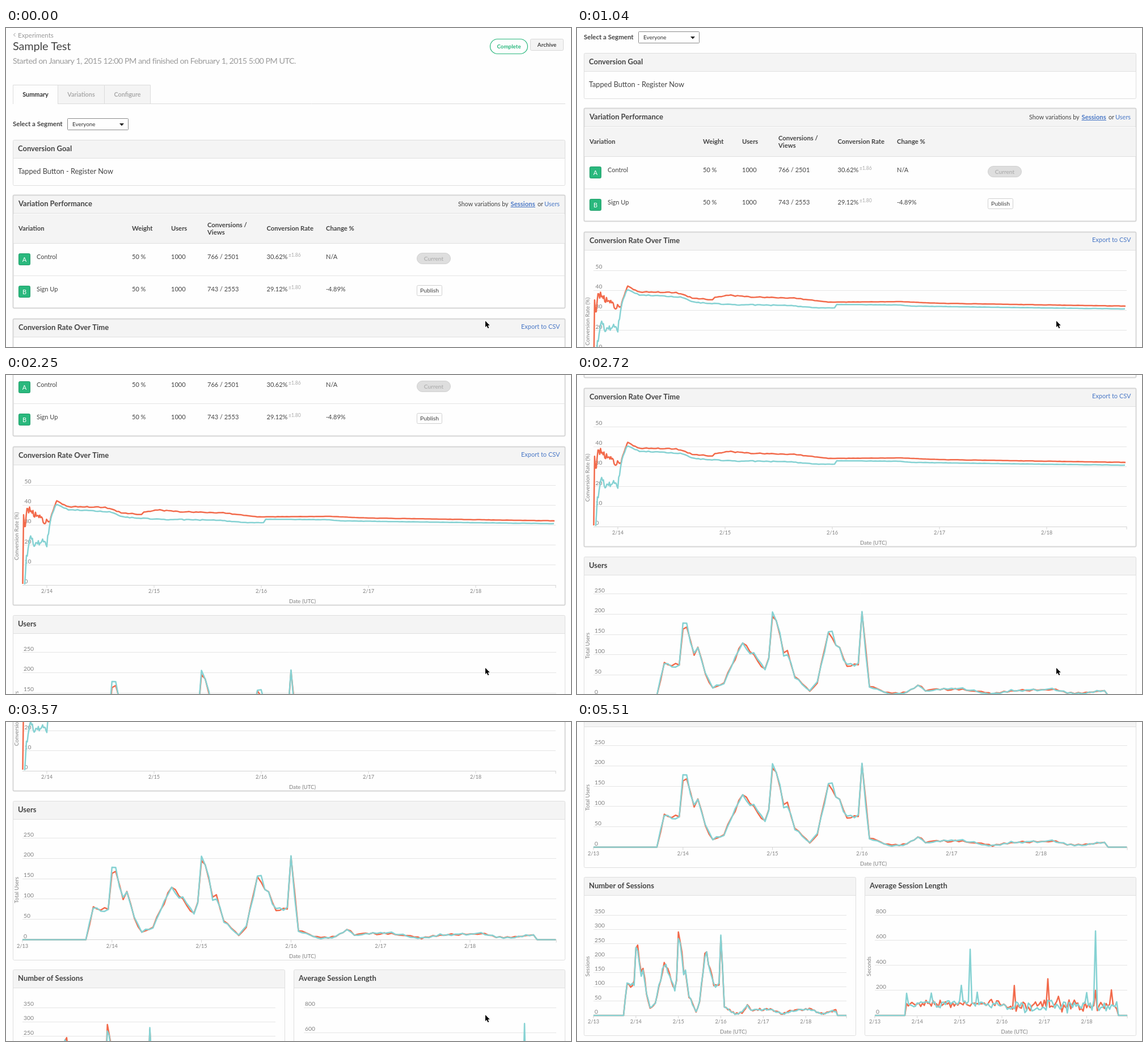
These frames come from a looping animation (996 by 562 pixels, 6.66 s). An HTML page with a canvas:

```html
<!DOCTYPE html>
<html lang="en">
<head>
<meta charset="utf-8">
<title>Sample Test</title>
<style>
html, body { margin: 0; width: 100%; height: 100%; overflow: hidden; background: #fefefe; }
canvas { display: block; }
</style>
</head>
<body>
<canvas id="stage" width="996" height="562"></canvas>
<script>
const W = 996, H = 562, LOOP = 6660;
const ctx = document.getElementById('stage').getContext('2d');
const RED = '#f26a4b', TEAL = '#86d2d3', GREEN = '#2ab87d', BLUE = '#4a78c6';
const INK = '#444', GREY = '#808080', PALE = '#f4f4f4', LINE = '#dcdcdc';

// The picture only changes at these moments: [first, count, interval]
const TICKS = [
  [0, 1, 0], [630, 1, 0], [800, 6, 116], [1500, 5, 150], [2250, 6, 118], [2960, 2, 110],
  [3220, 6, 118], [3930, 3, 115], [4550, 1, 0], [4940, 7, 95]
].flatMap(([t, n, gap]) => Array.from({ length: n }, (_, i) => t + i * gap));

// Time, scroll offset
const SCROLL = [
  [0, 0], [580, 0], [1040, 156], [1500, 285], [1650, 302], [1800, 303], [2250, 386],
  [3070, 599], [3220, 606], [3570, 706], [4160, 834], [4550, 833], [LOOP, 833]
];

// Conversion rate: x, y below the top of its card
const RATE_A = [
  [29.5, 242], [30, 103], [33, 155], [37, 108], [47, 118], [62, 127], [75, 136], [89, 96],
  [110, 106], [175, 107], [205, 117], [240, 120], [242, 115], [270, 112], [308, 115],
  [385, 117], [445, 124], [570, 123], [640, 126], [969, 131]
];
const RATE_B = [
  [33, 243], [36, 194], [43, 161], [52, 174], [62, 165], [72, 171], [79, 126], [88, 102],
  [110, 111], [185, 115], [205, 124], [262, 128], [380, 130], [420, 134], [455, 134],
  [457, 128], [570, 129], [590, 131], [969, 136]
];

// Users at turning points: hour, count
const USERS = [
  [17, 0], [19, 78], [21, 70], [23, 80], [24, 172], [25, 170], [27, 100], [28, 118], [30, 52],
  [32, 18], [35, 32], [40, 128], [43, 101], [46, 62], [47, 88], [48, 198], [50, 150], [51, 99],
  [52, 105], [54, 46], [58, 10], [60, 32], [63, 152], [64, 150], [68, 74], [71, 78], [72, 200],
  [74, 21], [80, 4], [84, 7], [87, 25], [89, 13], [99, 16], [107, 3], [112, 12], [123, 15],
  [129, 4], [137, 12], [138, 0], [143, 0]
];

function random(seed) {
  return () => (seed = (seed * 16807) % 2147483647) / 2147483647;
}

function span(keys, x) {
  const i = keys.findIndex(k => k[0] >= x);
  return i < 0 ? keys.length - 1 : Math.max(1, i);
}

function linear(keys, x) {
  const i = span(keys, x), [x0, y0] = keys[i - 1], [x1, y1] = keys[i];
  return y0 + (y1 - y0) * (x - x0) / (x1 - x0);
}

// Smooth monotone curve through the keys
function smooth(keys, x) {
  const i = span(keys, x), [x0, y0] = keys[i - 1], [x1, y1] = keys[i];
  const slope = j => j < 1 || j >= keys.length ? 0
    : (keys[j][1] - keys[j - 1][1]) / (keys[j][0] - keys[j - 1][0]);
  const tangent = j => {
    const a = slope(j), b = slope(j + 1);
    return a * b > 0 ? 2 * a * b / (a + b) : 0;
  };
  const w = x1 - x0, u = (x - x0) / w, v = 1 - u;
  return y0 * v * v * (1 + 2 * u) + y1 * u * u * (3 - 2 * u)
    + w * u * v * (v * tangent(i - 1) - u * tangent(i));
}

const hourly = f => Array.from({ length: 144 }, (_, h) => f(h));

function traffic(seed, scale) {
  const r = random(seed);
  return hourly(h => {
    const v = h < 17 ? 0 : linear(USERS, h), n = 2 * r() - 1;
    return v ? scale * Math.max(0, v + n * (2 + v * 0.05)) : 0;
  });
}

function lengths(seed, spikes) {
  const r = random(seed);
  return hourly(h => {
    const n = r() + r() - 1;
    if (h < 18 || h > 137) return 0;
    return spikes[h] || (h < 75 ? 92 + n * 38 : 75 + n * 58);
  });
}

// Restless at first, calm once the average has settled
function rate(keys, seed) {
  const r = random(seed), points = [];
  for (let x = keys[0][0]; x <= 969; x += x < 90 ? 1.5 : 4) {
    const wobble = points.length < 2 ? 0 : x < 80 ? 12 : x < 400 ? 1.6 : 0.4;
    points.push([x, 512 + linear(keys, x) + (r() - 0.5) * wobble]);
  }
  return points;
}

const usersA = traffic(71, 1), usersB = traffic(905, 1);
const sessA = traffic(318, 1.43), sessB = traffic(1207, 1.41);
const lenA = lengths(4177, { 79: 238, 98: 292, 104: 152, 125: 200, 134: 203 });
const lenB = lengths(2203, { 18: 176, 32: 178, 49: 240, 54: 527, 58: 185, 120: 182, 125: 672 });
const rateA = rate(RATE_A, 53), rateB = rate(RATE_B, 641);

function text(s, x, y, size, color = INK, weight = 400, align = 'left', spacing = 0) {
  ctx.font = `${weight} ${size}px Lato, "Open Sans", sans-serif`;
  ctx.letterSpacing = spacing + 'px';
  ctx.fillStyle = color;
  ctx.textAlign = align;
  ctx.fillText(s, x, y);
}
const bold = (s, x, y, size, color, align) => text(s, x, y, size, color, 700, align);

function path(points) {
  ctx.beginPath();
  points.forEach(([x, y]) => ctx.lineTo(x, y));
}

function line(points, color, width = 1) {
  path(points);
  ctx.strokeStyle = color;
  ctx.lineWidth = width;
  ctx.lineJoin = 'round';
  ctx.stroke();
}
const rule = (x0, y0, x1, y1, color = LINE) => line([[x0, y0], [x1, y1]], color);

function box(x, y, w, h, r, fill, stroke, lw = 1) {
  ctx.beginPath();
  ctx.roundRect(x + 0.5, y + 0.5, w - 1, h - 1, r);
  if (fill) { ctx.fillStyle = fill; ctx.fill(); }
  if (stroke) { ctx.strokeStyle = stroke; ctx.lineWidth = lw; ctx.stroke(); }
}

function panel(title, x, y, w, h, heavy) {
  box(x, y, w, h, 2, '#fefefe');
  ctx.fillStyle = PALE;
  ctx.fillRect(x + 1, y + 1, w - 2, 31);
  rule(x, y + 32.5, x + w, y + 32.5, '#e0e0e0');
  box(x, y, w, h, 2, null, heavy ? '#d6d6d6' : '#dedede', heavy ? 1.9 : 1);
  bold(title, x + (heavy ? 10 : 9), y + 20, 13);
}

function axes(c) {
  for (let v = 0; v <= c.max; v += c.step) {
    const y = c.base - (c.base - c.top) * v / c.max, row = Math.floor(y) + 0.5;
    rule(c.x0, row, c.x1, row, v ? '#e5e5e5' : '#d4d4d4');
    text(v, c.x0 + c.inset, y - 3, 10.3, GREY);
  }
  for (let i = 0; i < 6 - c.skip; i++) {
    const x = c.tick + c.day * i;
    rule(x, c.base, x, c.base + 5, '#d4d4d4');
    text('2/' + (13 + c.skip + i), x, c.base + 14, 9.2, GREY, 400, 'center');
  }
  rule(c.x1, c.base, c.x1, c.base + 5, '#d4d4d4');
  text('Date (UTC)', c.mid, c.base + 32, 9.7, GREY, 400, 'center');
  ctx.save();
  ctx.translate(c.x0 - 7.5, (c.base + c.top) / 2 + 2);
  ctx.rotate(-Math.PI / 2);
  text(c.name, 0, 0, 9.6, GREY, 400, 'center');
  ctx.restore();
}

function hourChart(c, a, b) {
  c = { inset: 2, skip: 0, tick: c.x0, ...c };
  axes(c);
  const place = list => list.map((v, h) => [
    c.x0 + c.day * h / 24, c.base - (c.base - c.top) * v / c.max
  ]);
  line(place(a), RED, 2.5);
  line(place(b), TEAL, 2.5);
}

function rateChart() {
  axes({ x0: 29, x1: 969, base: 756, top: 580, max: 50, step: 10, inset: 3.5,
    tick: 72, day: 189, skip: 1, mid: 522.5, name: 'Conversion Rate (%)' });
  line(rateA, RED, 2.5);
  line(rateB, TEAL, 2.5);
}

function header() {
  line([[16.5, 9], [13.5, 12], [16.5, 15]], '#999');
  text('Experiments', 21, 16.5, 11.5, '#999');
  text('Sample Test', 12, 39, 20, INK, 400, 'left', -0.2);
  text('Started on January 1, 2015 12:00 PM and finished on February 1, 2015 5:00 PM UTC.',
    12, 63, 14.3, '#9b9b9b', 400, 'left', -0.5);
  box(853, 19, 67, 27, 13, '#fefefe', GREEN, 1.2);
  bold('Complete', 886.5, 36, 9.8, GREEN, 'center');
  box(924, 19, 59, 21, 2, PALE, '#d8d8d8');
  bold('Archive', 953.5, 33, 9.8, INK, 'center');

  box(91, 100, 83, 34, 0, PALE, LINE);
  box(173, 100, 82, 34, 0, PALE, LINE);
  rule(91, 133.5, 986, 133.5);
  line([[12.5, 134], [12.5, 100.5], [92, 100.5]], LINE);
  bold('Summary', 52, 121, 10.9, '#333', 'center');
  bold('Variations', 132.5, 121, 10.8, '#aaa', 'center');
  bold('Configure', 214, 121, 10.8, '#aaa', 'center');

  bold('Select a Segment', 12, 173, 11.5);
  box(108, 159, 108, 21, 1, '#fefefe', '#8c8c8c');
  text('Everyone', 117, 173, 9.9, '#333');
  path([[200, 168], [208, 168], [204, 172.5]]);
  ctx.fillStyle = '#222';
  ctx.fill();
}

const COLUMNS = [54, 222, 291, 355, 459.5, 564];

function row(y, letter, cells, error) {
  box(22, y - 10, 21, 21, 2, GREEN, '#1f9e6a');
  text(letter, 32.5, y + 4.5, 11, '#fff', 400, 'center');
  COLUMNS.forEach((x, i) => text(cells[i], x, y, 11));
  text(error, 498, y - 4, 8.5, '#aaa');
}

function performanceTable() {
  panel('Variation Performance', 12, 294, 974, 200, true);
  text('Show variations by', 797, 313.5, 10.7);
  bold('Sessions', 889.5, 313.5, 11.4, BLUE);
  rule(889.5, 315.5, 933, 315.5, BLUE);
  text('or', 937, 313.5, 10.7);
  text('Users', 949, 313.5, 11, BLUE);
  ctx.fillStyle = PALE;
  ctx.fillRect(13, 328, 972, 51);
  rule(13, 379.5, 985, 379.5, '#e0e0e0');
  rule(13, 436.5, 985, 436.5, '#e4e4e4');
  ['Weight', 'Users', '', 'Conversion Rate', 'Change %']
    .forEach((s, i) => bold(s, COLUMNS[i + 1], 357, 11.3));
  bold('Variation', 22, 357, 11.3);
  bold('Conversions /', 355, 350.5, 11.3);
  bold('Views', 355, 364, 11.3);
  row(407, 'A', ['Control', '50 %', '1000', '766 / 2501', '30.62%', 'N/A'], '±1.86');
  row(464, 'B', ['Sign Up', '50 %', '1000', '743 / 2553', '29.12%', '-4.89%'], '±1.80');
  box(724, 396, 60, 20, 9.5, '#dedede', '#d0d0d0');
  text('Current', 754, 410, 10.2, '#a6a6a6', 400, 'center');
  box(724, 453, 45, 19, 2, '#fefefe', '#d0d0d0');
  text('Publish', 746.5, 466, 10.4, INK, 400, 'center');
}

function page() {
  header();
  panel('Conversion Goal', 12, 197, 974, 81);
  text('Tapped Button - Register Now', 21, 257, 12.7);
  performanceTable();

  panel('Conversion Rate Over Time', 12, 512, 974, 280, true);
  text('Export to CSV', 976.5, 530, 11, BLUE, 400, 'right');
  rateChart();

  panel('Users', 12, 809, 974, 281);
  hourChart({ x0: 29, x1: 970, base: 1053.5, top: 874.5, max: 250, step: 50,
    day: 157.8, mid: 522.5, name: 'Total Users' }, usersA, usersB);

  panel('Number of Sessions', 12, 1106, 480, 280);
  hourChart({ x0: 29, x1: 475, base: 1350, top: 1173, max: 350, step: 50,
    day: 74.85, mid: 275.5, name: 'Sessions' }, sessA, sessB);

  panel('Average Session Length', 507, 1106, 479, 280);
  hourChart({ x0: 525, x1: 970, base: 1350, top: 1173, max: 800, step: 200,
    day: 74.7, mid: 771, name: 'Seconds' }, lenA, lenB);
}

function pointer(t) {
  const u = Math.min(1, Math.max(0, (t - 4880) / 630)), e = u * u * (3 - 2 * u);
  const x = 845 + 145 * e, y = 516 + 48 * e;
  path([[0, 0], [0, 11], [2.5, 8.8], [4.4, 13], [6.3, 12.2], [4.5, 8], [7.8, 8]]
    .map(([dx, dy]) => [x + dx, y + dy]));
  ctx.closePath();
  ctx.strokeStyle = '#fff';
  ctx.lineWidth = 1.8;
  ctx.stroke();
  ctx.fillStyle = '#000';
  ctx.fill();
}

function draw(now) {
  const t = TICKS.findLast(k => k <= now % LOOP);
  ctx.fillStyle = '#fefefe';
  ctx.fillRect(0, 0, W, H);
  ctx.save();
  ctx.translate(0, -Math.round(smooth(SCROLL, t)));
  page();
  ctx.restore();
  pointer(t);
}

const start = performance.now();
function tick() {
  draw(performance.now() - start);
  requestAnimationFrame(tick);
}
tick();
</script>
</body>
</html>
```
